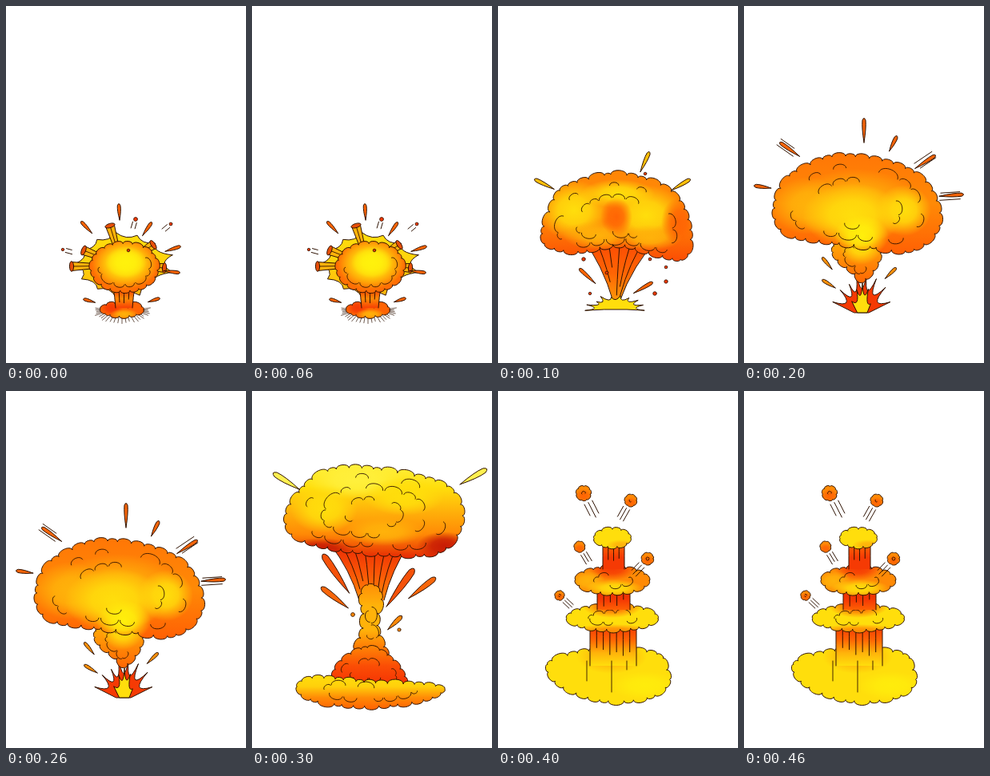
An HTML page with a canvas that plays this animation: 300x447 px, repeating every 500 ms.

```html
<!DOCTYPE html>
<html lang="en">
<head>
<meta charset="utf-8">
<title>Explosion</title>
<style>
html, body { margin: 0; width: 100%; height: 100%; overflow: hidden; background: #fff; }
#stage { position: relative; width: 300px; height: 447px; overflow: hidden; }
canvas { position: absolute; left: 0; top: 0; animation: play .5s steps(5) infinite; }
@keyframes play { to { transform: translateX(-1500px); } }
</style>
</head>
<body>
<div id="stage"><canvas id="strip" width="1500" height="447"></canvas></div>
<script>
const W = 300, H = 447, TAU = 2 * Math.PI;
const INK = '#2e1202', RED = '#f53a04', FIRE = '#ff6404', ORANGE = '#ff8a06', AMBER = '#ffb20a',
  YELLOW = '#ffde0c', PALE = '#fff03c';
const c = document.getElementById('strip').getContext('2d');
c.lineJoin = c.lineCap = 'round';

let seed = 7;
const rnd = () => (seed = seed * 16807 % 2147483647) / 2147483647;
const mix = (a, b, t) => a + (b - a) * t;
const mix2 = (p, q, t) => [mix(p[0], q[0], t), mix(p[1], q[1], t)];

function vertical(y0, y1, ...cols) {
  const g = c.createLinearGradient(0, y0, 0, y1);
  cols.forEach((col, i) => g.addColorStop(i / (cols.length - 1), col));
  return g;
}

function glow(x, y, rx, ry, col) {
  c.save();
  c.translate(x, y);
  c.scale(rx, ry);
  const g = c.createRadialGradient(0, 0, 0, 0, 0, 1);
  g.addColorStop(0, col);
  g.addColorStop(.45, col + 'd0');
  g.addColorStop(1, col + '00');
  c.fillStyle = g;
  c.fillRect(-1, -1, 2, 2);
  c.restore();
}

function ink(path, width = 1) {
  c.strokeStyle = INK;
  c.lineWidth = width;
  c.stroke(path);
}

function paint(path, fill, lights = []) {
  c.fillStyle = fill;
  c.fill(path);
  c.save();
  c.clip(path);
  lights.forEach(l => glow(...l));
  c.restore();
}

function line(p, q, width = .9) {
  const path = new Path2D();
  path.moveTo(...p);
  path.lineTo(...q);
  ink(path, width);
}

// Closed Catmull-Rom curve through the keys, as a fine polyline
function smooth(keys) {
  const n = keys.length, out = [];
  keys.forEach((p, i) => {
    const o = keys[(i + n - 1) % n], q = keys[(i + 1) % n], r = keys[(i + 2) % n];
    for (let t = 0; t < 1; t += 1 / 16) {
      out.push([0, 1].map(k => p[k] + t / 2 * (q[k] - o[k] +
        t * (2 * o[k] - 5 * p[k] + 4 * q[k] - r[k] + t * (3 * (p[k] - q[k]) + r[k] - o[k])))));
    }
  });
  return out;
}

// Dips between bumps: unevenly spaced along the curve and set in by one bump height
function dips(curve, step) {
  const n = curve.length, at = [0];
  curve.forEach((p, i) => {
    const q = curve[(i + 1) % n];
    at.push(at[i] + Math.hypot(q[0] - p[0], q[1] - p[1]));
  });
  const count = Math.max(5, Math.round(at[n] / step)), out = [];
  for (let k = 0, i = 0; k < count; k++) {
    const goal = (k + rnd() * .45) / count * at[n];
    while (at[i + 1] < goal) i++;
    const [x, y] = curve[i], [u, v] = curve[(i + 1) % n];
    const inset = .26 * step / (Math.hypot(u - x, v - y) || 1);
    out.push([x - (v - y) * inset, y + (u - x) * inset]);
  }
  return out;
}

function bump(path, [x, y], [u, v], h = .38) {
  const nx = (v - y) * h, ny = (x - u) * h;
  path.bezierCurveTo(x + nx, y + ny, u + nx, v + ny, u, v);
}

// Billow with bumps on the rim, and broken rows of bumps inside at the given scales
function cloud(keys, step, fill, lights, rows = [.8, .55]) {
  const curve = smooth(keys), rim = dips(curve, step), path = new Path2D();
  const mid = [0, 1].map(k => curve.reduce((s, p) => s + p[k], 0) / curve.length);
  path.moveTo(...rim[0]);
  rim.forEach((p, i) => bump(path, p, rim[(i + 1) % rim.length]));
  paint(path, fill, lights);
  ink(path);
  rows.forEach(k => {
    const row = dips(curve.map(p => mix2(mid, p, k)), step * 1.3);
    row.forEach((p, i) => {
      if (rnd() < .42) return;
      const arc = new Path2D();
      arc.moveTo(...p);
      bump(arc, p, mix2(p, row[(i + 1) % row.length], .9), .45);
      ink(arc, .9);
    });
  });
}

const oval = (x, y, rx, ry) => Array.from({ length: 10 }, (_, i) =>
  [x + rx * Math.cos(i * TAU / 10), y + ry * Math.sin(i * TAU / 10)]);

// Spikes around an ellipse, joined by sagging curves; a foot closes an open fan
function spikes(x, y, rx, ry, n, from, to, sag, fill, foot) {
  const path = new Path2D();
  const at = (i, k) => {
    const a = mix(from, to, i / n) * TAU;
    return [x + rx * k * Math.cos(a), y + ry * k * Math.sin(a)];
  };
  const first = at(0, 1);
  path.moveTo(...first);
  for (let i = 1; i <= n; i++) {
    const tip = i === n && !foot ? first : at(i, 1 - .22 * rnd());
    path.quadraticCurveTo(...at(i - .5, sag), ...tip);
  }
  if (foot) {
    path.lineTo(x + foot, y);
    path.lineTo(x - foot, y);
  }
  path.closePath();
  paint(path, fill);
  ink(path);
}

// Flared trunk between two levels, with folds running down it
function trunk(y0, l0, r0, y1, l1, r1, n, fill) {
  const side = t => {
    const a = mix(l0, r0, t), b = mix(l1, r1, t);
    return [[a, y0], [mix(a, b, .68), mix(y0, y1, .45)], [b, y1]];
  };
  const [a, b, d] = side(0), [e, f, g] = side(1), path = new Path2D();
  path.moveTo(...a);
  path.quadraticCurveTo(...b, ...d);
  path.lineTo(...g);
  path.quadraticCurveTo(...f, ...e);
  paint(path, fill);
  for (let i = 0; i <= n; i++) {
    const [p, q, r] = side(i / n), s = i % n ? mix(.5, .95, rnd()) : 1;
    const fold = new Path2D(), h = mix2(p, q, s);
    fold.moveTo(...p);
    fold.quadraticCurveTo(...h, ...mix2(h, mix2(q, r, s), s));
    ink(fold);
  }
}

const toward = ([x, y], [u, v]) => {
  const d = Math.hypot(u - x, v - y);
  return [(u - x) / d, (v - y) / d];
};

// Drops with a blunt head and a tail that points at the centre
function rays(centre, len, w, fill, ...heads) {
  heads.forEach(([x, y]) => {
    const [dx, dy] = toward([x, y], centre), path = new Path2D();
    const at = (s, t) => [x + dx * s - dy * t, y + dy * s + dx * t];
    path.moveTo(...at(len, 0));
    path.quadraticCurveTo(...at(len * .4, w), ...at(w * .7, w * .7));
    path.quadraticCurveTo(...at(-w, 0), ...at(w * .7, -w * .7));
    path.quadraticCurveTo(...at(len * .4, -w), ...at(len, 0));
    paint(path, fill);
    ink(path);
  });
}

function dots(r, fill, ...places) {
  places.forEach(([x, y]) => {
    const path = new Path2D();
    path.arc(x, y, r * mix(.7, 1.1, rnd()), 0, TAU);
    paint(path, fill);
    ink(path, .8);
  });
}

// Parallel strokes behind a flying piece
function trail([x, y], centre, start, len, gap, n) {
  const [dx, dy] = toward([x, y], centre);
  for (let i = 0; i < n; i++) {
    const t = (i - (n - 1) / 2) * gap, s = start + len * mix(.7, 1, rnd());
    line([x + dx * start - dy * t, y + dy * start + dx * t], [x + dx * s - dy * t, y + dy * s + dx * t], 1);
  }
}

// Burning tube flung out of the centre
function tube([x, y], centre, w) {
  const [dx, dy] = toward([x, y], centre), path = new Path2D(), cap = new Path2D();
  const at = (s, t) => [x + dx * s - dy * t, y + dy * s + dx * t];
  path.moveTo(...at(0, w));
  path.lineTo(...at(26, w * .6));
  path.lineTo(...at(26, -w * .6));
  path.lineTo(...at(0, -w));
  paint(path, AMBER);
  ink(path);
  line(at(0, 0), at(26, 0));
  cap.ellipse(x, y, 2.6, w + .8, Math.atan2(dy, dx), 0, TAU);
  paint(cap, '#e8500a');
  ink(cap);
}

function blast() {
  const centre = [145, 325], ground = [145, 381];
  spikes(145, 323, 65, 45, 13, -.04, .96, .66, vertical(280, 365, YELLOW, '#ffd20c', AMBER));
  [[130, 275], [97, 306], [82, 326], [184, 299], [198, 328]].forEach(p => tube(p, centre, 5.5));
  for (let i = 0; i <= 24; i++) {
    const a = mix(-.03, .53, i / 24) * TAU, k = mix(1, 1.2, rnd()), x = Math.cos(a), y = Math.sin(a);
    line([145 + 27 * x, 381 + 9 * y], [145 + 31 * k * x, 381 + 14 * k * y], .7);
  }
  cloud(oval(145, 380, 30, 11), 11, FIRE, [[132, 378, 14, 9, RED], [148, 386, 18, 7, AMBER]], [.6]);
  trunk(352, 134, 161, 378, 137, 158, 4, vertical(354, 379, RED, ORANGE, RED));
  cloud(oval(148, 327, 45, 33), 13, FIRE, [[148, 324, 52, 40, ORANGE], [149, 322, 42, 32, '#ffe80c'],
    [150, 321, 26, 20, '#fff20c']], [.8]);
  rays(centre, 20, 2.6, FIRE, [141, 248], [94, 270], [182, 271], [218, 301], [217, 334]);
  rays(ground, 15, 2.5, FIRE, [97, 367], [192, 366]);
  [[206, 273], [162, 267], [71, 305]].forEach(p => trail(p, centre, 4, 9, 5, 2));
  dots(2.3, RED, [153, 306], [206, 273], [162, 267], [71, 305]);
}

function mushroom() {
  trunk(288, 104, 202, 370, 144, 152, 6, vertical(300, 368, '#fb4e04', FIRE, '#ff9608'));
  spikes(147, 380, 38, 20, 9, .49, 1.01, .42, YELLOW, 14);
  cloud([[51, 288], [64, 250], [75, 228], [110, 214], [152, 207], [205, 221], [231, 244], [244, 285],
    [234, 320], [190, 312], [150, 302], [100, 311], [62, 304]], 15, vertical(207, 322, '#ff8606', ORANGE, '#fb4a04'),
    [[95, 256, 44, 38, YELLOW], [185, 262, 48, 38, YELLOW], [150, 235, 46, 18, YELLOW],
      [125, 287, 44, 18, AMBER], [190, 290, 40, 16, AMBER], [148, 264, 20, 24, FIRE], [226, 270, 22, 30, FIRE]]);
  rays([150, 270], 27, 3, '#ffc00a', [189, 183], [46, 217], [240, 217]);
  rays([148, 372], 27, 2.8, FIRE, [102, 329], [193, 346]);
  dots(2.4, RED, [184, 210], [190, 317], [107, 317], [210, 327], [115, 360], [136, 334], [196, 360], [210, 345]);
}

function plume() {
  const centre = [150, 245], ground = [145, 372];
  spikes(147, 384, 37, 54, 7, .54, .96, .2, RED, 9);
  spikes(148, 384, 14, 38, 4, .56, .94, .3, YELLOW, 6);
  cloud([[108, 300], [140, 286], [172, 300], [169, 325], [157, 340], [147, 350], [136, 336], [115, 320]], 13,
    vertical(290, 348, AMBER, ORANGE, FIRE), [[146, 300, 26, 24, YELLOW]], [.65]);
  cloud([[34, 257], [47, 218], [72, 200], [116, 184], [181, 192], [226, 214], [247, 252], [244, 284],
    [208, 310], [150, 304], [100, 298], [50, 288]], 16, vertical(184, 310, '#ff7606', ORANGE, '#ff6004'),
    [[80, 250, 46, 36, AMBER], [140, 250, 80, 46, AMBER], [135, 262, 62, 40, YELLOW],
      [147, 288, 34, 26, '#fff00c'], [200, 256, 34, 32, YELLOW]]);
  rays(centre, 30, 2.9, '#f4640a', [150, 141], [45, 171], [239, 187], [274, 236]);
  rays(centre, 21, 2.9, '#f4640a', [191, 163], [13, 225]);
  rays(ground, 19, 2.6, '#fa900a', [98, 315], [98, 343], [190, 328]);
  [[42, 169], [239, 185], [272, 237]].forEach(p => trail(p, centre, 2, 28, 9, 2));
}

function tower() {
  trunk(192, 98, 196, 262, 134, 165, 7, vertical(198, 262, '#ee3204', '#fb5806', ORANGE));
  cloud([[133, 255], [148, 238], [165, 255], [159, 285], [163, 310], [172, 335], [124, 335], [132, 310], [137, 285]],
    14, vertical(238, 330, ORANGE, AMBER, AMBER, FIRE), [], [.5]);
  cloud([[97, 358], [113, 333], [146, 318], [174, 331], [194, 358], [186, 374], [104, 374]], 13,
    vertical(318, 370, ORANGE, '#fb4e05', '#f43004'), []);
  cloud([[52, 372], [75, 356], [150, 362], [222, 365], [245, 374], [215, 390], [145, 398], [75, 390]], 14,
    vertical(356, 398, YELLOW, '#ffd00b', ORANGE, FIRE), [], [.65]);
  cloud([[40, 172], [44, 142], [78, 104], [125, 92], [200, 102], [248, 118], [267, 152], [255, 188],
    [220, 208], [120, 203], [62, 190]], 16, vertical(92, 208, PALE, YELLOW, AMBER, ORANGE, '#e62c04'),
    [[85, 198, 44, 14, '#c81c04'], [240, 194, 34, 18, '#c81c04'], [130, 112, 62, 24, PALE],
      [90, 148, 42, 30, YELLOW], [190, 132, 50, 24, YELLOW], [165, 176, 50, 18, AMBER]], [.82, .6, .36]);
  rays([150, 180], 38, 4.4, '#fff050', [27, 103], [293, 98]);
  rays([150, 295], 58, 5.5, '#f5520a', [89, 205], [202, 223]);
  rays([150, 295], 42, 4.5, '#f8660a', [87, 246], [229, 234]);
  rays([150, 318], 24, 3.6, '#fb890a', [187, 282]);
  dots(2.8, ORANGE, [126, 280], [184, 299]);
}

function tiers() {
  cloud([[57, 344], [78, 330], [132, 320], [200, 326], [213, 345], [217, 367], [190, 387], [130, 391], [75, 371]],
    15, YELLOW, [[142, 332, 44, 22, AMBER], [184, 369, 42, 18, '#ffec0c']], []);
  trunk(293, 115, 173, 344, 115, 173, 7, vertical(295, 344, RED, FIRE, AMBER, YELLOW));
  [[111, 363], [142, 377], [161, 349]].forEach(([x, y]) => line([x, 338], [x, y]));
  cloud(oval(143, 284, 61, 18), 14, YELLOW, [[143, 268, 38, 16, FIRE], [143, 301, 56, 9, ORANGE]], [.6]);
  trunk(247, 124, 165, 274, 124, 165, 5, vertical(249, 275, '#e72c05', RED, FIRE));
  cloud(oval(143, 237, 50, 19), 14, ORANGE, [[143, 222, 30, 15, RED], [112, 238, 22, 13, AMBER],
    [145, 247, 36, 11, YELLOW]], [.6]);
  trunk(192, 131, 158, 223, 131, 158, 4, vertical(193, 224, FIRE, RED, RED));
  cloud(oval(143, 184, 26, 14), 12, YELLOW, [[155, 193, 20, 7, AMBER]], [.6]);
  [[107, 128, 11], [166, 137, 9], [102, 195, 8], [187, 210, 9], [77, 256, 7]].forEach(([x, y, r]) => {
    trail([x, y], [135, y + 55], r + 2, r * 1.9, r * .5, 3);
    cloud(oval(x, y, r, r), r * .85, ORANGE, [[x, y + r * .3, r, r * .8, FIRE]], [.5]);
  });
}

[blast, mushroom, plume, tower, tiers].forEach((draw, i) => {
  c.save();
  c.translate(i * W, 0);
  c.beginPath();
  c.rect(0, 0, W, H);
  c.clip();
  draw();
  c.restore();
});
</script>
</body>
</html>
```
